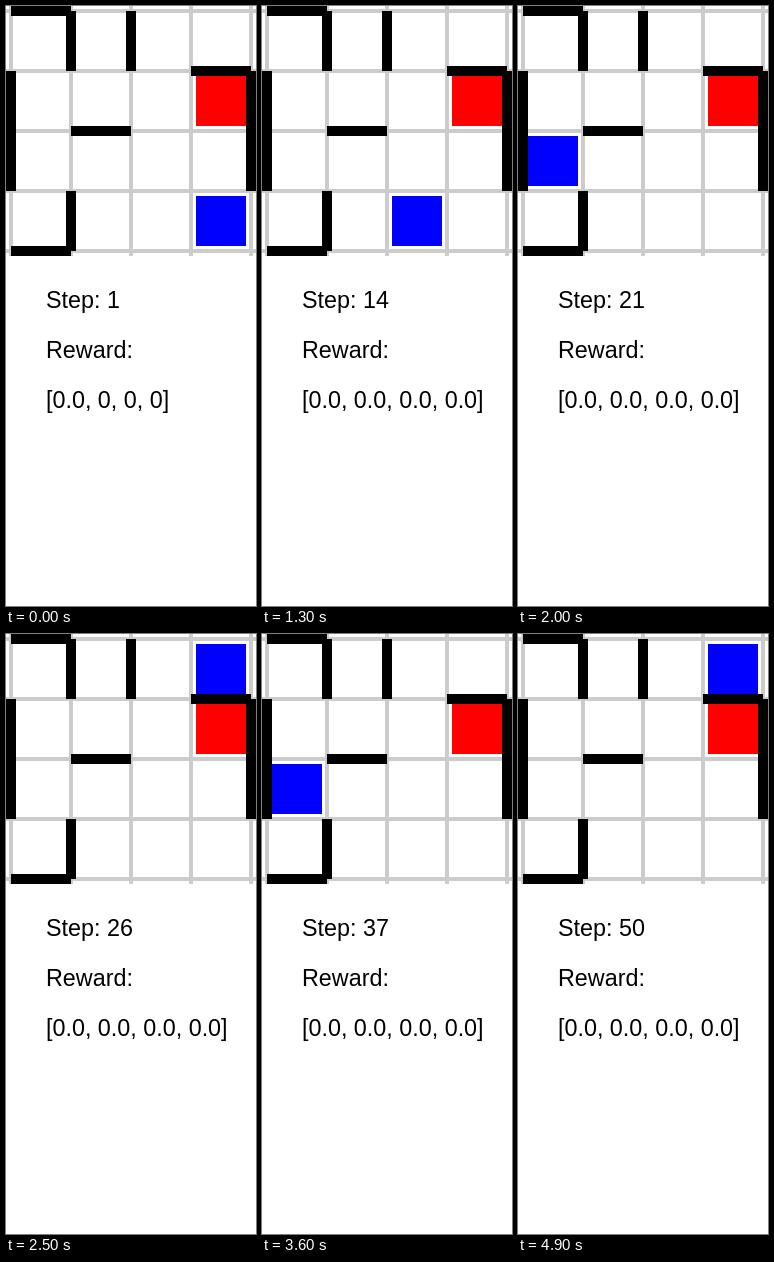
An HTML page that plays this animation: 250x600 px, repeating every 5 s.

```html
<!DOCTYPE html>
<html lang="en">
<head>
<meta charset="utf-8">
<title>Grid walk</title>
<style>
  html, body { margin: 0; width: 100%; height: 100%; overflow: hidden; background: #fff; }
  svg { display: block; }
  text { font: 23.33px "Liberation Sans", Arial, sans-serif; fill: #000; }
  .grid { stroke: #ccc; stroke-width: 4; }
  .wall { stroke: #000; stroke-width: 10; }
</style>
</head>
<body>
<svg width="250" height="600" viewBox="0 0 250 600">
  <path class="grid" d="M5 0V250M65 0V250M125 0V250M185 0V250M245 0V250M0 5H250M0 65H250M0 125H250M0 185H250M0 245H250"/>
  <path class="wall" d="M5 5H65M65 5V65M125 5V65M185 65H245M5 65V185M245 65V185M65 125H125M65 185V245M5 245H65"/>
  <rect x="190" y="70" width="50" height="50" fill="#f00"/>
  <rect id="agent" x="190" y="190" width="50" height="50" fill="#00f"/>
  <text id="step" x="40" y="302">Step: 1</text>
  <text x="40" y="352">Reward:</text>
  <text id="reward" x="40" y="402">[0.0, 0, 0, 0]</text>
</svg>
<script>
const STEP_MS = 100;
const ACTIONS = "UDLR";
const SHIFT = { U: [0, -1], D: [0, 1], L: [-1, 0], R: [1, 0], ".": [0, 0] };
// One letter per step; a dot is a move blocked by a wall.
const MOVES = "UUDLDUDUURDDULDRRDRLDUUDULLDUUDDLLDRLUULUD..LRRDUL";

const wrap = n => (n + 4) % 4;
const byId = id => document.getElementById(id);
const agent = byId("agent"), stepText = byId("step"), rewardText = byId("reward");

// The board wraps around at its edges.
let col = 3, row = 0;
const states = [...MOVES].map((move, i) => {
  const [dx, dy] = SHIFT[move];
  col = wrap(col + dx);
  row = wrap(row + dy);
  const past = MOVES.slice(0, i + 1);
  const rewards = [...ACTIONS].map(a => past.includes(a) ? "0.0" : "0");
  return { x: 10 + 60 * col, y: 10 + 60 * row, reward: `[${rewards.join(", ")}]` };
});

const start = performance.now();
let shown = -1;

function draw(now) {
  const i = Math.floor(Math.max(0, now - start) / STEP_MS) % states.length;
  if (i !== shown) {
    const s = states[i];
    agent.setAttribute("x", s.x);
    agent.setAttribute("y", s.y);
    stepText.textContent = `Step: ${i + 1}`;
    rewardText.textContent = s.reward;
    shown = i;
  }
  requestAnimationFrame(draw);
}
draw(start);
</script>
</body>
</html>
```
